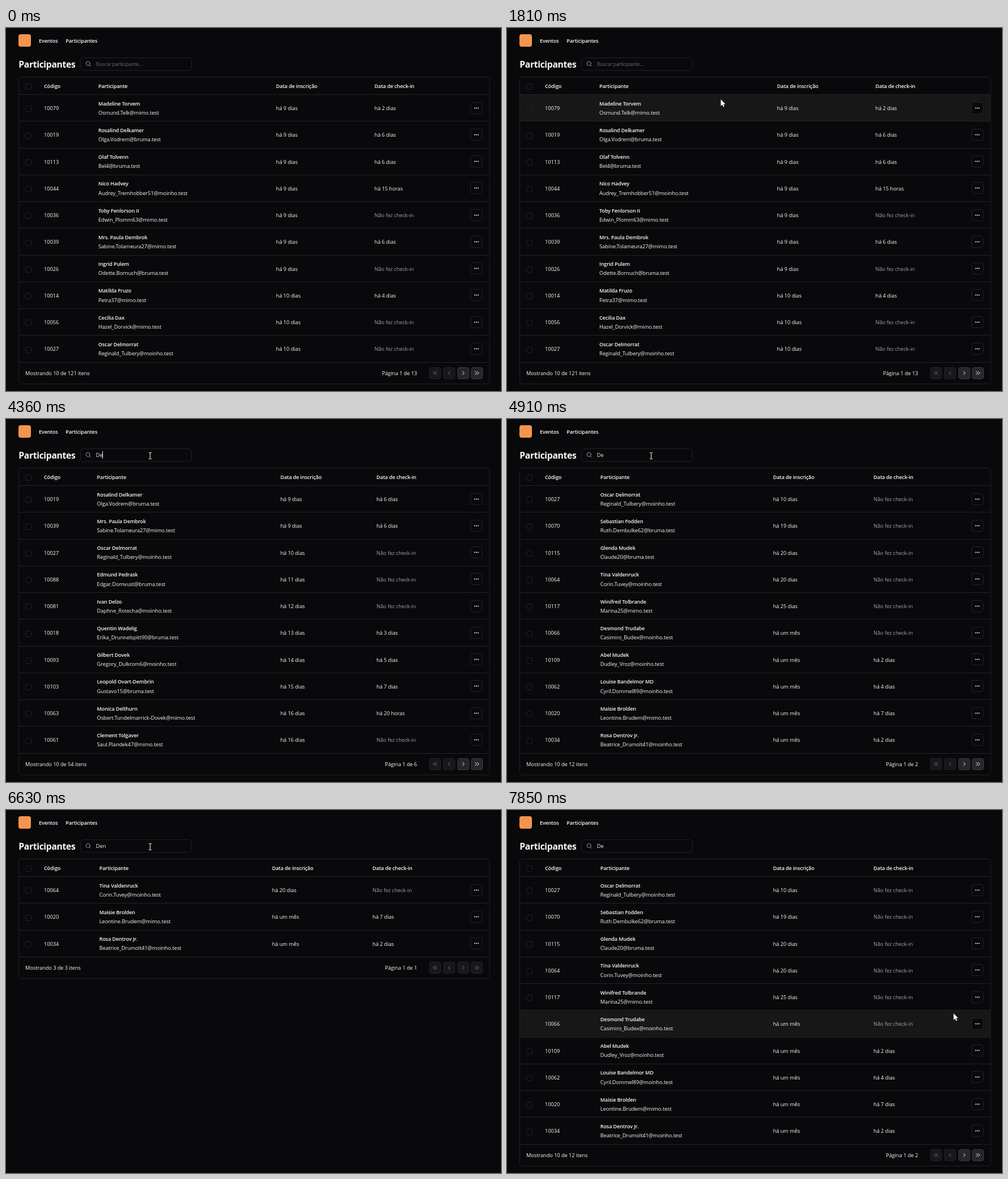
Animation, 874 px wide and 641 px high, one loop 8 s. Source, as an HTML page:

```html
<!DOCTYPE html>
<html lang="pt-BR">
<head>
<meta charset="utf-8">
<title>Participantes</title>
<style>
  html, body { margin: 0; width: 100%; height: 100%; overflow: hidden; background: #09090b; }
  svg { display: block; width: 100vw; height: 100vh; }
  text { font: 9.3px "Open Sans", "Noto Sans", sans-serif; letter-spacing: -.08px; fill: #fafafa; white-space: pre; }
  .b { font-size: 9.1px; font-weight: 600; letter-spacing: -.15px; }
  .h1 { font-size: 15.7px; font-weight: 700; letter-spacing: -.34px; }
  .hint { font-size: 9px; letter-spacing: -.32px; fill: #646b7c; }
  .no { fill: #a1a1aa; }
  .end { text-anchor: end; }
  .box, .line { fill: none; stroke: #232326; }
  .more { fill: #09090b; }
  .icon { fill: none; stroke: #fafafa; stroke-linecap: round; stroke-linejoin: round; }
</style>
</head>
<body>
<svg viewBox="0 0 874 641">
  <rect width="874" height="641" fill="#09090b"/>
  <rect x="22" y="11" width="22" height="22" rx="4" fill="#f4954f"/>
  <text class="b" x="58" y="26">Eventos</text>
  <text class="b" x="105.3" y="26">Participantes</text>
  <text class="h1" x="22.3" y="70">Participantes</text>
  <rect class="box" x="131.5" y="52.5" width="196" height="22.5" rx="5"/>
  <g class="icon" style="stroke:#7d9cab"><circle cx="144.7" cy="62.8" r="3.6"/><path d="M147.4 65.5l2.2 2.2"/></g>
  <text id="query" x="158.8" y="67"></text>
  <path id="caret" d="M0 57V70" stroke="#fafafa"/>
  <g id="hover"></g>
  <g id="table"></g>
  <path id="arrow" d="M0 0V11.8L2.7 9.3L4.5 13.4L6.4 12.6L4.6 8.6H8.2Z" fill="#fff" stroke="#000" stroke-width=".8" paint-order="stroke"/>
  <path id="beam" d="M-2.5-5.5H-.7L0-5L.7-5.5H2.5M0-5V5M-2.5 5.5H-.7L0 5L.7 5.5H2.5" fill="none" stroke="#fff"/>
</svg>
<script>
const $ = id => document.getElementById(id);
const LOOP = 8000, TOP = 117.5, ROW = 47.25;

// code | name | mailbox and domain key | registered | checked in
const people = {};
`10079|Madeline Torvem|Osmund.Telk@g|9 dias|2 dias
10019|Rosalind Delkamer|Olga.Vodrem@y|9 dias|6 dias
10113|Olaf Tolvenn|Bel4@y|9 dias|6 dias
10044|Nico Hadvey|Audrey_Tremhobber51@h|9 dias|15 horas
10036|Toby Fenlorson II|Edwin_Plomm63@g|9 dias|
10039|Mrs. Paula Dembrok|Sabine.Tolameura27@g|9 dias|6 dias
10026|Ingrid Pulem|Odette.Bornuch@y|9 dias|
10014|Matilda Fruzo|Petra37@g|10 dias|4 dias
10056|Cecilia Dax|Hazel_Dorvick@g|10 dias|
10027|Oscar Delmorrat|Reginald_Tulbery@h|10 dias|
10088|Edmund Pedrask|Edgar.Domvust@y|11 dias|
10081|Ivan Delzo|Daphne_Rotecha@h|12 dias|
10018|Quentin Wadelig|Erika_Drunnelspitt90@y|13 dias|3 dias
10093|Gilbert Dovek|Gregory_Dulkrom6@h|14 dias|5 dias
10103|Leopold Ovart-Dembrin|Gustavo15@y|15 dias|7 dias
10063|Monica Delthurn|Osbert.Tundelmarrick-Dovek@g|16 dias|20 horas
10061|Clement Tolgaver|Saul.Plandek47@g|16 dias|
10064|Tina Valdenruck|Corin.Tuvey@h|20 dias|
10020|Maisie Brolden|Leontine.Brudem@g|um mês|7 dias
10034|Rosa Dentrov Jr.|Beatrice_Drumolt41@h|um mês|2 dias
10070|Sebastian Fodden|Ruth.Dembulke62@y|19 dias|
10115|Glenda Mudek|Claude20@y|20 dias|
10117|Winifred Tolbrande|Marina25@g|25 dias|
10066|Desmond Trudabe|Casimiro_Budex@h|um mês|
10109|Abel Mudek|Dudley_Vroz@h|um mês|2 dias
10062|Louise Bandelmor MD|Cyril.Dommel89@h|um mês|4 dias`.split('\n').forEach(line => {
  const [code, ...rest] = line.split('|');
  people[code] = rest;
});
const domains = { g: 'mimo.test', y: 'bruma.test', h: 'moinho.test' };

const view = (codes, total, pages, cols) => ({ codes: codes.split(' '), total, pages, cols });
const all = view('10079 10019 10113 10044 10036 10039 10026 10014 10056 10027', 121, 13, [163, 476.8, 650.5]);
const allLater = { ...all, later: true };
const byD = view('10019 10039 10027 10088 10081 10018 10093 10103 10063 10061', 54, 6, [160.6, 484.4, 654]);
const byDe = view('10027 10070 10115 10064 10117 10066 10109 10062 10020 10034', 12, 2, [164.8, 469.7, 647]);
const byDen = view('10064 10020 10034', 3, 1, byDe.cols);

const views = [[0, all], [3300, allLater], [3830, byD], [4760, byDe], [5370, byDen], [7600, byDe]];
const queries = [[0, ''], [3300, 'D'], [4360, 'De'], [5040, 'Den'], [7440, 'De']];
const blinks = [[0, 0], [2360, 1], [2890, 0], [3300, 1], [3830, 0], [4360, 1], [4910, 0],
  [5040, 1], [5570, 0], [6100, 1], [6630, 0], [7170, 1], [7700, 0]];
const caretX = [159.5, 166.5, 170.5, 175.5];
const path = [[520, 540, 572], [1260, 430, 340], [1640, 388, 160], [1810, 378, 126], [2090, 280, 76],
  [2430, 254, 65], [6640, 254, 65], [7170, 824, 180], [7430, 824, 180], [7690, 790, 356], [7850, 788, 359]];

const at = (steps, t) => steps.findLast(s => s[0] <= t)[1];

function pointer(t) {
  if (t < path[0][0]) return null;
  const i = path.findLastIndex(p => p[0] <= t), a = path[i], b = path[i + 1] || a;
  const k = b === a ? 0 : (t - a[0]) / (b[0] - a[0]);
  return [a[1] + (b[1] - a[1]) * k, a[2] + (b[2] - a[2]) * k];
}

function hoveredRow(t) {
  const p = pointer(t);
  if (!p || p[1] < TOP) return -1;
  const row = Math.floor((p[1] - TOP) / ROW);
  return row < at(views, t).codes.length ? row : -1;
}

// strokes sit on pixel centres, baselines on whole pixels
const snap = v => Math.floor(v) + .5;
const text = (x, y, s, cls = '') => `<text class="${cls}" x="${x}" y="${Math.round(y)}">${s}</text>`;
const line = y => `<path class="line" d="M22.5 ${snap(y)}H854"/>`;
const box = (x, y, w, h, r, cls = '') =>
  `<rect class="box ${cls}" x="${x}" y="${snap(y)}" width="${w}" height="${h}" rx="${r}"/>`;
const check = y => box(34.5, y - 5, 10, 10, 2.2);

function rowMarkup(v, code, i) {
  const y = TOP + ROW * i, [a, b, c] = v.cols;
  let [name, mail, joined, seen] = people[code];
  if (v.later) seen = seen.replace('15 h', '16 h');
  const [user, key] = mail.split('@');
  const dots = [-3, 0, 3].map(d => `<circle cx="${830.6 + d}" cy="${snap(y + 23.6)}" r=".95" fill="#fafafa"/>`).join('');
  return check(y + 25.3) + text(67, y + 27.6, code) + text(a, y + 19.2, name, 'b') +
    text(a, y + 35.4, user + '@' + domains[key]) + text(b, y + 27.6, 'há ' + joined) +
    (seen ? text(c, y + 27.6, 'há ' + seen) : text(c, y + 27.6, 'Não fez check-in', 'no')) +
    box(820.5, y + 13.5, 20, 20, 3.5, 'more') + dots + line(y + ROW);
}

function pageButton(i, y, on) {
  const x = Math.round(747.2 + 24.7 * i) + .5, dir = i < 2 ? -1 : 1;
  const chevron = dx => `M${x + 10 + dx - dir * 1.3} ${y - 2.8}l${dir * 2.8} 2.8l${-dir * 2.8} 2.8`;
  const d = i % 3 ? chevron(0) : chevron(-1.8) + chevron(1.8);
  return `<g opacity="${on ? 1 : .5}"><rect x="${x}" y="${snap(y - 10)}" width="20" height="20" rx="3.5" fill="#27272a" stroke="#3a3a3f"/>` +
    `<path class="icon" d="${d}"/></g>`;
}

function tableMarkup(v) {
  const n = v.codes.length, foot = TOP + ROW * n, mid = foot + 19.3;
  return box(22.5, 86.5, 831.5, snap(foot + 38) - 86.5, 5) + check(103.2) + line(TOP) +
    ['Código', 'Participante', 'Data de inscrição', 'Data de check-in']
      .map((s, i) => text([67, ...v.cols][i], 105.7, s, 'b')).join('') +
    v.codes.map((code, i) => rowMarkup(v, code, i)).join('') +
    text(34, mid + 3.2, `Mostrando ${n} de ${v.total} itens`) +
    text(725.8, mid + 3.2, `Página 1 de ${v.pages}`, 'end') +
    [0, 1, 2, 3].map(i => pageButton(i, mid, i > 1 && v.pages > 1)).join('');
}

for (let i = 0; i < 10; i++)
  $('hover').innerHTML += `<rect x="23" y="${snap(TOP + ROW * i)}" width="830.5" height="${ROW}" fill="#171717"/>`;
const glows = [...$('hover').children];

let shown;
function draw(t) {
  const v = at(views, t);
  if (v !== shown) $('table').innerHTML = tableMarkup(shown = v);

  // 150 ms fade as the average of recent hover states
  const recent = Array.from({ length: 10 }, (_, k) => hoveredRow(Math.max(0, t - k * 15)));
  glows.forEach((g, i) => g.setAttribute('opacity',
    i < v.codes.length ? recent.filter(r => r === i).length / 10 : 0));

  const q = at(queries, t);
  $('query').textContent = q || 'Buscar participante...';
  $('query').setAttribute('class', q ? '' : 'hint');
  $('caret').setAttribute('transform', `translate(${caretX[q.length]})`);
  $('caret').setAttribute('opacity', at(blinks, t));

  const p = pointer(t);
  const inField = p && p[0] > 131 && p[0] < 327 && p[1] > 52 && p[1] < 75;
  for (const [id, on] of [['arrow', p && !inField], ['beam', inField]]) {
    $(id).setAttribute('visibility', on ? 'visible' : 'hidden');
    if (on) $(id).setAttribute('transform', `translate(${snap(p[0])} ${Math.round(p[1])})`);
  }
}

const start = performance.now();
function tick(now) {
  draw(Math.max(0, now - start) % LOOP);
  requestAnimationFrame(tick);
}
tick(start);
</script>
</body>
</html>
```
